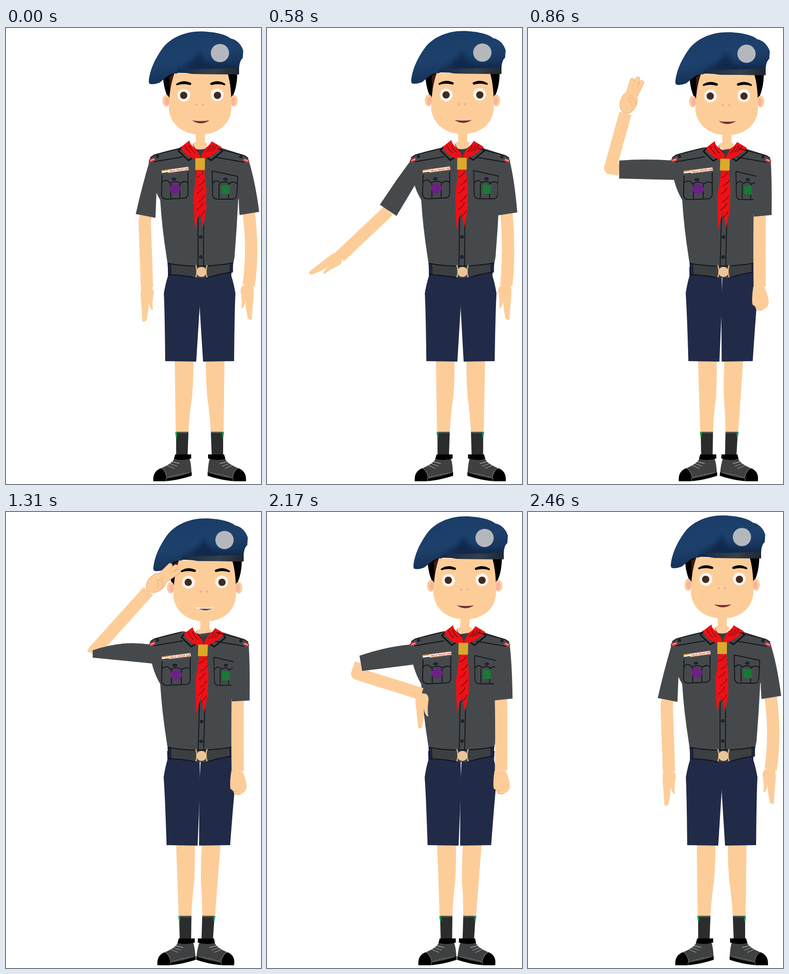
Write an HTML page that moves like this. It is 559 px wide and 1002 px high and loops after 2.5 s.

```html
<!DOCTYPE html>
<html lang="en">
<head>
<meta charset="utf-8">
<title>Saluting cadet</title>
<style>
  html, body { margin: 0; height: 100%; overflow: hidden; background: #fff; }
  svg { display: block; width: 100vw; height: 100vh; }
  .skin { fill: #fdcd99; }
  .cloth { fill: #46494c; }
  .line { fill: none; stroke: #101214; stroke-width: 1.8; }
  .limb { fill: none; stroke: #fdcd99; stroke-width: 27; stroke-linejoin: round; }
  .crease { fill: none; stroke: #e3a970; stroke-width: 1; }
  .button { fill: #1d2d52; stroke: #0b0d12; stroke-width: 1.2; }
</style>
</head>
<body>
<svg viewBox="0 0 559 1002">
  <defs>
    <linearGradient id="felt" x1=".2" y1="0" x2=".6" y2="1">
      <stop offset="0" stop-color="#1a3c66"/>
      <stop offset=".5" stop-color="#1d416c"/>
      <stop offset="1" stop-color="#12294c"/>
    </linearGradient>
    <linearGradient id="band">
      <stop offset="0" stop-color="#142844"/>
      <stop offset=".6" stop-color="#35414b"/>
      <stop offset="1" stop-color="#1d2831"/>
    </linearGradient>
    <linearGradient id="sock" x2="0" y2="1">
      <stop offset="0" stop-color="#77736c"/>
      <stop offset=".08" stop-color="#2b2d2d"/>
    </linearGradient>
    <filter id="soft"><feGaussianBlur stdDeviation="5"/></filter>
    <clipPath id="beretShape"><path id="beret" d="M313 118C314 98 324 70 345 42C365 18 400 5 438 8C468 10 486 17 492 23C506 25 517 38 520 50L519 66Q512 72 511 87V102L410 101Q376 95 357 104Q346 112 337 120Q320 126 314 122Z"/></clipPath>
  </defs>

  <g id="legL">
    <g id="leg">
      <path class="skin" d="M370 728L372 889H400Q402 850 408 810Q411 770 411 728Z"/>
      <path fill="url(#sock)" d="M373 887H400L398 942H373Z"/>
      <path fill="#14a04c" d="M371 888H375Q376 897 373 903Z"/>
      <path fill="#212a47" d="M355 525H426L425 605L417 733L349 732Q348 620 346 583Q350 560 355 545Z"/>
      <path fill="#3e4042" d="M369 946Q365 956 345 965Q324 974 323 995L350 996Q358 990 402 984L407 983Q406 955 402 946Z"/>
      <path d="M371 937H406V946Q388 952 368 947ZM323 996Q321 974 340 967Q352 976 352 996ZM350 996Q380 993 407 984V976Q380 987 350 990Z"/>
      <path fill="none" stroke="#b5a995" stroke-dasharray="3 2" d="M340 967Q352 975 352 990Q362 983 404 977"/>
      <path fill="none" stroke="#aaa69d" stroke-width="1.3" d="M353 961L369 968M359 957L375 963M364 953L380 957"/>
    </g>
  </g>
  <g id="legR"><use href="#leg" transform="matrix(-1 0 0 1 849 0)"/></g>

  <g id="head">
    <path class="skin" d="M416 222V250L408 254Q412 266 425 268Q438 266 442 254L436 250V222Z"/>
    <g id="hairSide">
      <path d="M344 102Q345 136 358 158L376 96Z"/>
      <ellipse class="skin" cx="351" cy="160" rx="8" ry="13"/>
      <ellipse fill="#f7b3a0" cx="353" cy="161" rx="5" ry="9"/>
    </g>
    <use href="#hairSide" transform="matrix(-1 0 0 1 851 0)"/>
    <path fill="#3b1c18" d="M358 106L359 140L371 100Z"/>
    <path class="skin" d="M369 100Q357 135 357 180C362 218 395 234 426 234S490 218 494 180Q495 130 486 100Z"/>
    <path id="brow" d="M373 123Q388 112 406 121Q407 126 402 125Q388 121 374 126Z"/>
    <use href="#brow" transform="matrix(-1 0 0 1 854 0)"/>
    <g fill="#fdf4ef"><circle cx="390" cy="148" r="14"/><circle cx="463" cy="147" r="14"/></g>
    <g fill="#412b20"><circle cx="389.500" cy="148" r="8"/><circle cx="463.500" cy="148" r="8"/></g>
    <g fill="#f4b08f"><circle cx="417.500" cy="168" r="2.600"/><circle cx="431.500" cy="168" r="2.600"/></g>
    <path id="mouth" fill="#7c2b34"/>
    <path id="teeth" fill="#fff" d="M405 203Q427 205 446 203Q444 206 436 206H414Q407 206 405 203Z"/>
    <use href="#beret" fill="url(#felt)"/>
    <g clip-path="url(#beretShape)">
      <path fill="#0f2342" opacity=".7" filter="url(#soft)" d="M378 92Q405 84 425 50Q430 75 455 82L515 84V92H400Z"/>
      <path fill="url(#band)" d="M378 91Q440 91 512 87V103H400Q390 98 372 98Z"/>
    </g>
    <circle cx="469" cy="55" r="20" fill="#b4b8bd"/>
  </g>

  <path class="cloth" d="M387 262Q347 271 325 278Q316 283 313 292Q318 345 338 378Q342 440 352 503L355 524H497L501 503Q506 440 509 378Q525 340 533 292Q530 283 521 279L468 262L425 268Z"/>

  <path fill="#3c3f42" d="M355 517Q390 523 428 523Q470 522 497 516V536Q465 541 440 549H417Q390 543 355 542Z"/>
  <path class="line" d="M355 517Q390 524 428 523Q470 522 497 516M355 542Q390 543 417 549M440 549Q465 541 497 536"/>
  <path fill="#1d2747" stroke="#0b0d18" d="M355 518H361L362 540L356 543ZM491 517H497V536L491 539Z"/>
  <path fill="none" stroke="#d9b07c" stroke-width="2.500" d="M416 521Q421 535 416 548M441 521Q436 535 441 548"/>
  <circle cx="428.500" cy="536" r="11" fill="#e9c59b"/>

  <g id="pocketL">
    <path class="line" d="M342 323L341 368Q343 376 352 376L392 374Q398 372 399 365V316M342 339Q352 330 359 341Q371 334 383 341Q391 334 399 340M361 342V374M381 342V373"/>
    <ellipse class="button" cx="368" cy="332" rx="4" ry="2.500"/>
    <g transform="translate(341 313) rotate(-8)">
      <rect width="59" height="7.500" fill="#fff"/>
      <path fill="#f0983a" d="M0 0H14V2.500H0Z"/><path fill="#243a2c" d="M0 5.500H14V7.500H0Z"/>
      <path fill="#d9823c" d="M14 0H59V1H14ZM14 6.500H59V7.500H14Z"/>
      <text x="16" y="5.700" font-family="Liberation Sans, sans-serif" font-size="4.800" font-weight="bold" fill="#b3342c">FIELD TROOP UNIT</text>
    </g>
    <circle cx="370.500" cy="353" r="11.500" fill="#6b2184"/>
  </g>
  <g id="pocketR">
    <path class="line" d="M508 326L452 314L453 368Q455 376 463 376H498Q505 375 506 366L508 326M453 341Q462 331 470 341Q480 334 490 342Q498 335 507 342M467 342V374M488 342V375"/>
    <ellipse class="button" cx="481" cy="332" rx="4" ry="2.500"/>
    <rect x="472" y="345" width="18" height="20" fill="#187a34"/>
  </g>

  <g id="front">
    <path class="line" stroke-width="1.500" d="M421 415V523M433 415V523"/>
    <circle class="button" cx="427" cy="459" r="3"/><circle class="button" cx="427" cy="503" r="3"/>
    <path fill="#3a3d40" d="M408 262Q425 272 442 262L434 290H416Z"/>
    <path class="cloth" d="M385 261L378 270L400 291L415 283ZM468 261L474 271L450 291L436 283Z"/>
    <path class="line" style="stroke-width:3" d="M385 261L378 270L400 291L414 282M468 261L474 271L450 291L437 282"/>
    <g fill="#ee1016">
      <path d="M402 247L383 262Q392 281 414 288H425Q427 274 412 262Q403 256 402 247ZM451 249Q446 258 438 263Q430 274 426 288H436Q460 277 473 262Z"/>
      <path d="M418 310L411 370L414 442L424 405L432 438L439 400V350L434 310Z"/>
    </g>
    <path id="folds" class="line" style="stroke-width:1"/>
    <rect x="415" y="286" width="21" height="26" fill="#dba92c"/>
  </g>

  <path id="foreR" class="limb"/>
  <g id="handR">
    <use class="open" href="#openHand" transform="translate(-3 0) scale(-1 1)"/>
    <g class="closed">
      <path class="skin" d="M-14 0Q-18 25 -16 40Q-9 44 -8 50Q0 56 7 51Q18 48 20 35Q17 12 9 0Z"/>
      <path class="crease" d="M-15 40Q-8 44 -8 50Q0 54 7 51M-10 44Q-3 48 -1 43"/>
    </g>
  </g>
  <path id="sleeveR" class="cloth"/>

  <path id="foreL" class="limb"/>
  <g id="handL">
    <g class="open"><path id="openHand" class="skin" d="M-13 2Q-6 -4 10 0Q17 6 14 18Q11 35 13 50L9 48Q4 40 4 32L3 50L-1 72Q-7 78 -10 74Q-11 55 -13 32Q-15 14 -13 2Z"/></g>
    <g class="closed" transform="rotate(180)" stroke-linecap="round">
      <path id="fingers" fill="none" stroke="#e3a970" stroke-width="10.500" d="M-9 -38L-11 -73M-1 -40V-80M6 -36L10 -76"/>
      <ellipse cx="-2" cy="-25" rx="18" ry="25" class="skin" stroke="#e3a970"/>
      <path class="limb" style="stroke-width:9" d="M-9 -38L-11 -73M-1 -40V-80M6 -36L10 -76"/>
      <path class="crease" d="M16 -24Q12 -36 2 -36Q-8 -34 -4 -28Q4 -30 8 -20M-5 -38Q-2 -44 2 -40"/>
    </g>
  </g>
  <path id="sleeveL" class="cloth"/>

  <g id="epaulette">
    <path class="line" d="M316 285L325 279L384 264M324 294L388 283"/>
    <path fill="#e0393e" d="M314 290L325 285L328 291L316 295Z"/>
    <path fill="none" stroke="#fff" stroke-width="1.200" d="M317 291L325 288"/>
    <circle class="button" cx="332" cy="282" r="2.600"/>
  </g>
  <use href="#epaulette" transform="matrix(-1 0 0 1 847 1)"/>
</svg>

<script>
const $ = id => document.getElementById(id);
const set = (id, attr, value) => $(id).setAttribute(attr, value);
const LOOP = 2500;
const SHOULDER = [326, 312];

// lean: body sideways, rise: head down, step: feet closing, cuff and elbow: points,
// open: half sleeve width, fore: forearm angle, reach: forearm length, hand: hand angle
const rest = { lean: 0, rise: 0, step: 0, cuff: [306, 413], elbow: [304, 425], open: 22, fore: 88, reach: 145, hand: 0 };
const out = { lean: .3, rise: -1, step: .1, cuff: [266, 401], elbow: [258, 410], open: 22, fore: 136, reach: 136, hand: 56 };
const raised = { lean: 1, rise: 1.5, step: .85, cuff: [200, 311], elbow: [180, 308], open: 20, fore: 285, reach: 124, hand: 200 };
const salute = { lean: 1, rise: 6.5, step: 1, cuff: [190, 312], elbow: [193, 306], open: 8, fore: 312, reach: 178, hand: 229 };
const across = { lean: .8, rise: 2, step: 1, cuff: [205, 332], elbow: [197, 355], open: 17, fore: 377, reach: 148, hand: 358 };
const home = { ...rest, fore: rest.fore + 360, hand: 360 };

const linear = u => u;
const easeIn = u => u * u;
const easeOut = u => 1 - (1 - u) ** 2;
const moves = [
  { start: 0, end: 330, from: rest, to: rest, ease: linear },
  { start: 330, end: 580, from: rest, to: out, ease: easeIn },
  { start: 580, end: 860, from: out, to: raised, ease: linear },
  { start: 860, end: 980, from: raised, to: salute, ease: easeOut },
  { start: 980, end: 2050, from: salute, to: salute, ease: linear },
  { start: 2050, end: 2170, from: salute, to: across, ease: linear },
  { start: 2170, end: 2460, from: across, to: home, ease: easeOut },
  { start: 2460, end: LOOP, from: home, to: home, ease: linear }
];

const mix = (a, b, u) => Array.isArray(a) ? a.map((v, i) => mix(v, b[i], u)) : a + (b - a) * u;

function poseAt(t) {
  const { start, end, from, to, ease } = moves.find(m => t < m.end);
  const u = ease((t - start) / (end - start));
  return Object.fromEntries(Object.keys(from).map(key => [key, mix(from[key], to[key], u)]));
}

function showHand(id, open) {
  $(id).querySelector('.open').style.display = open ? '' : 'none';
  $(id).querySelector('.closed').style.display = open ? 'none' : '';
}

function skewLeg(id, shift) {
  const k = shift / 350;
  set(id, 'transform', `matrix(1 0 ${k} 1 ${-600 * k} 0)`);
}

function squeeze(id, pivot, scale, dy) {
  set(id, 'transform', `translate(${pivot} ${dy}) scale(${scale} 1) translate(${-pivot} 0)`);
}

function drawBody({ lean, rise, step }) {
  const dx = 6 * lean, dy = .75 * rise;
  const kx = dx / 235, ky = dy / 235;
  set('head', 'transform', `translate(${10 * lean} ${rise})`);
  set('front', 'transform', `matrix(1 0 ${-kx} ${1 - ky} ${535 * kx} ${535 * ky})`);
  squeeze('pocketL', 341, 1 + dx / 72, dy);
  squeeze('pocketR', 491, 1 - dx / 60, dy);
  skewLeg('legL', 8 * step);
  skewLeg('legR', -23 * step);
}

function drawLeftArm({ cuff: [cx, cy], elbow: [ex, ey], open, fore, reach, hand }) {
  const angle = fore * Math.PI / 180;
  const wx = ex + reach * Math.cos(angle), wy = ey + reach * Math.sin(angle);
  set('foreL', 'd', `M${cx} ${cy}L${ex} ${ey}L${wx} ${wy}`);
  set('handL', 'transform', `translate(${wx} ${wy}) rotate(${hand})`);

  const dx = cx - SHOULDER[0], dy = cy - SHOULDER[1], length = Math.hypot(dx, dy);
  const nx = -dy / length, ny = dx / length;
  const topX = cx + nx * open, topY = cy + ny * open, bulge = 24 - open;
  const midX = (315 + topX) / 2 + nx * bulge, midY = (291 + topY) / 2 + ny * bulge;
  set('sleeveL', 'd', `M315 291Q${midX} ${midY} ${topX} ${topY}L${cx - nx * open} ${cy - ny * open}L331 334Z`);
}

function drawRightArm({ lean, rise }) {
  const x = 532 - 24 * lean, drop = 3 * lean + rise / 3;
  set('foreR', 'd', `M${x} ${405 + drop}Q${543 - 36 * lean} 490 ${x} ${566 + drop / 2}`);
  set('handR', 'transform', `translate(${x} ${566 + drop / 2})`);
  set('sleeveR', 'd', `M532 291Q${546 - 11 * lean} 335 ${555 - 21 * lean} ${404 + 2 * drop}` +
    `L${512 - 17 * lean} ${411 + drop}Q${509 - 17 * lean} 380 ${511 - 12 * lean} 328Z`);
}

function drawMouth(t) {
  const beat = Math.floor((t - 1148) / 81) + 1;
  const talking = beat > 0 && beat < 9;
  const depth = talking && beat % 2 === 0 ? 237 : 216;
  set('mouth', 'd', `M408 203Q427 206 446 203Q427 ${depth} 408 203Z`);
  $('teeth').style.display = talking ? '' : 'none';
}

function draw(t) {
  const pose = poseAt(t);
  drawBody(pose);
  drawLeftArm(pose);
  drawRightArm(pose);
  drawMouth(t);
  showHand('handL', t < 720 || t >= 2110);
  showHand('handR', t < 720 || t >= 2310);
}

let folds = '';
for (let i = 0; i < 6; i++) {
  folds += `M${432 + i % 2 * 4} ${316 + 17 * i}q-4 9 -14 ${12 + i}`;
  if (i < 3) folds += `M${392 + 9 * i} ${258 - i}q5 12 13 17M${462 - 7 * i} ${256 + i}q-3 10 -11 15`;
}
set('folds', 'd', folds);

const origin = performance.now();
function tick() {
  draw((performance.now() - origin) % LOOP);
  requestAnimationFrame(tick);
}
tick();
</script>
</body>
</html>
```
